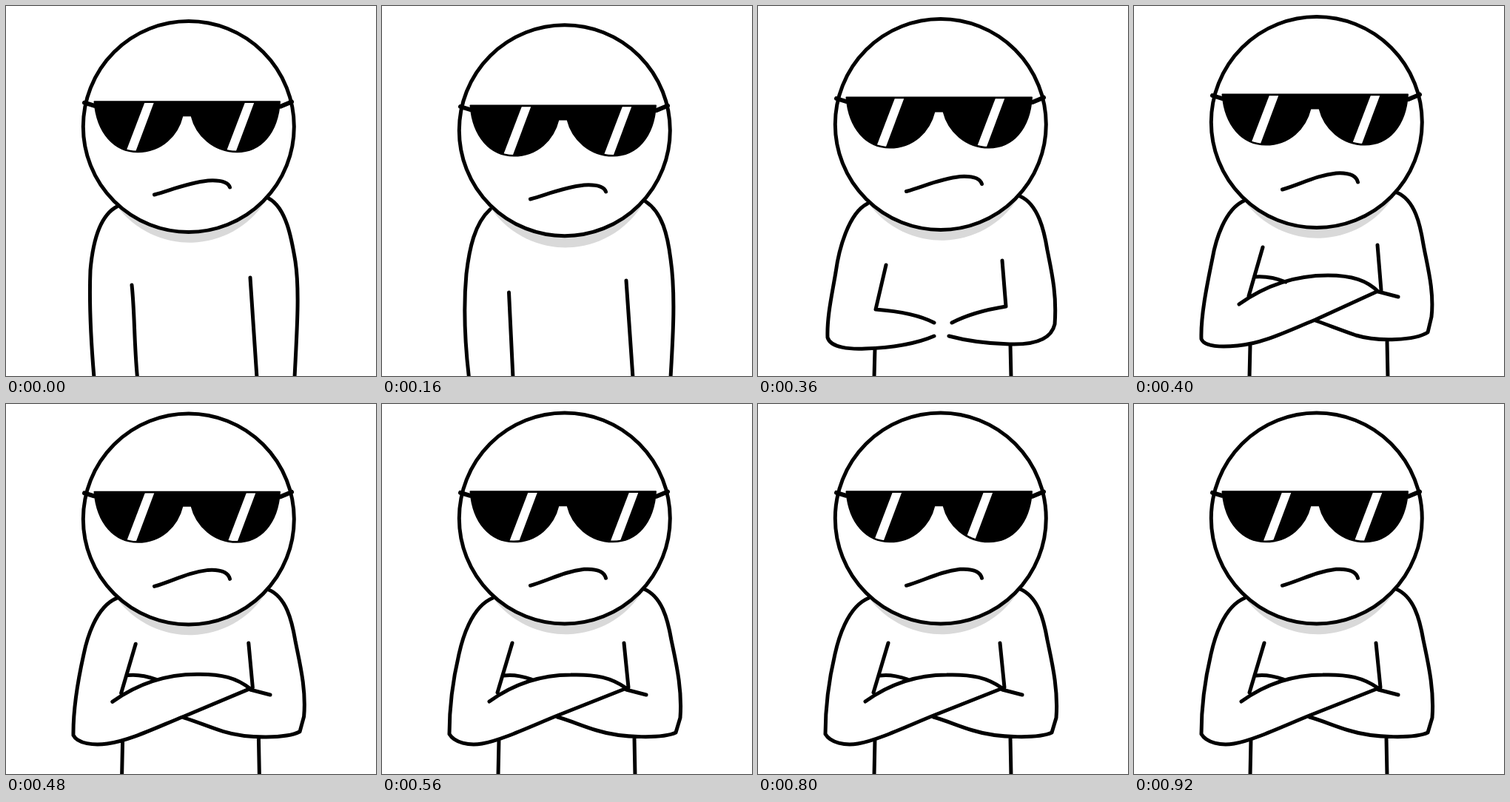
An HTML page that plays this animation: 500x500 px, repeating every 1800 ms.

```html
<!DOCTYPE html>
<html lang="en">
<head>
<meta charset="utf-8">
<title>Crossed arms</title>
<style>
  html, body { margin: 0; width: 100%; height: 100%; overflow: hidden; background: #fff; }
  svg { display: block; width: 100vw; height: 100vh; }
  .line { fill: none; stroke: #000; stroke-width: 5; stroke-linecap: round; stroke-linejoin: round; }
</style>
</head>
<body>
<svg viewBox="0 0 500 500">
  <defs>
    <!-- Glasses are drawn with their top edge at y = 0 -->
    <clipPath id="lenses">
      <path d="M121 2.8H238C236 34 212 67.5 178 67.5C147 67.5 125 44 121 2.8Z
               M251 2.8H369C366 44 343 67.5 312 67.5C280 67.5 256 42 251 20Z"/>
    </clipPath>
  </defs>
  <path id="shadow" fill="#d9d9d9" d="M150 107.5A122 122 0 0 0 350 101.5Z"/>
  <path id="body" class="line"/>
  <circle id="head" class="line" style="fill:#fff" cx="246.8" cy="0" r="142.5"/>
  <g id="glasses">
    <path class="line" stroke-width="6" style="stroke-width:6" d="M106 2.5L119 6.5M386 1.2L371 7.5"/>
    <path stroke="#000" stroke-width="2" stroke-linejoin="round"
      d="M119.5 1H370C367 44 344 69 312 69C281 69 257 47 250.5 20H238.5C232 47 210 69 178 69C147 69 123 44 119.5 1Z"/>
    <g clip-path="url(#lenses)" fill="#fff">
      <path id="shineL" d="M0 2H12.5L-12 67.5H-25Z"/>
      <path id="shineR" d="M0 2H12.5L-12 67.5H-25Z"/>
    </g>
  </g>
  <path id="mouth" class="line"/>
</svg>
<script>
const LOOP = 1800;
const el = id => document.getElementById(id);
const mix = (a, b, k) => a + (b - a) * k;

// Blend two paths that share the same commands
function mixPath(a, b, k) {
  const nums = b.match(/-?[\d.]+/g);
  let i = 0;
  return a.replace(/-?[\d.]+/g, n => mix(+n, +nums[i++], k).toFixed(2));
}

const hang = 'M150 271C125 284 117 322 114 357C112 408 115 455 119 502' +
  'M170 377C174 415 173 455 177.500 502' +
  'M355 260C379 273 386 315 391 345C397 385 393 440 390 502M330 367L339 502';
const dip = 'M146 275C125 294 118 328 114 362C110 405 112 455 117.500 502' +
  'M171.500 387L177 502' +
  'M356 264C379 279 386 310 390 342C397 390 393 450 390 502M330 371L339 502';
const rise = 'M148 271C126 280 118 330 113 360C107 405 111 455 115.500 502' +
  'M171 392C174 430 175 460 178 502' +
  'M353 261C377 273 384 302 389 330C399 388 395 440 392 502M330 379L338 502';
const swing = 'M148 267C122 280 109 330 105 360C100 390 93 420 94 448' +
  'C98 462 125 464 145 463C180 462 215 456 238 446M159 410C185 412 215 416 238 428' +
  'M173 350L159 410M330 344L335 406' +
  'M354 257C379 268 387 305 391 330C397 360 404 390 401 430' +
  'C396 452 370 458 340 457C305 456 280 452 258 446M335 406C310 410 285 416 262 428' +
  'M158 463L157 502M341 457L342 502';
const cross = 'M149 263C122 275 110 318 106 341C98 380 90 420 91 450' +
  'C95 461 120 461 140 459C175 456 210 438 245 424L328 386' +
  'M142 403C170 383 210 364 262 364C295 364 315 371 330 386M330 386L357 393' +
  'M164 366C178 365 190 367 205 373M174 326L155 392M329 323L334 384' +
  'M355 252C380 262 387 297 391 322C396 350 406 385 402 420L397 441' +
  'C380 452 330 454 300 445C280 438 262 431 245 425M157 458L156 502M342 453L343 502';
const settle = 'M150 262C120 274 108 320 104 338C96 372 91 410 91 446' +
  'C98 458 118 462 135 459C160 455 200 436 237 421L328 385' +
  'M145 402C170 384 205 366 255 366C290 365 310 370 330 384M330 386L357 393' +
  'M165 367C178 365 190 368 202 372M176 323L156 390M327 323L333 383' +
  'M354 250C378 260 386 290 391 319C397 348 406 385 403 424L397 444' +
  'C380 452 325 452 290 441C270 435 255 428 237 423M158 453L157 502M341 451L342 502';

// Head centre, shadow drop, glasses top, mouth corner, mouth height, body
const pose = (head, drop, glasses, mouth, tall, body) => ({ head, drop, glasses, mouth, tall, body });
const arrive = pose(157, 0, 118.5, 248, 22, cross);
const rest = pose(154.5, 0, 117.3, 245.3, 22, settle);
const between = k => {
  const p = {};
  for (const key of Object.keys(rest))
    p[key] = key === 'body' ? mixPath(cross, settle, k) : mix(arrive[key], rest[key], k);
  return p;
};

// Start time, pose, left and right glint
const steps = [
  [0, pose(163, 0, 128.2, 255, 19, hang), 187.5, 323],
  [160, pose(168.2, 1.5, 133.5, 261, 19, dip), 189, 325],
  [280, pose(163, 1, 127.2, 253.5, 19, rise), 187, 323],
  [360, pose(160, 0, 122.5, 250.5, 20, swing), 185, 321],
  [400, arrive, 183, 320],
  [480, between(0.6), 188, 325],
  [520, between(0.9), 192, 329],
  [560, rest, 197.5, 334],
  [600, rest, 212, 348],
  [640, rest, 136, 259],
  [680, rest, 152, 275]
];
// The glint slows down as it returns
for (let i = 1; i <= 6; i++) {
  const slide = 48 * (1 - Math.pow(1 - i / 6, 1.4));
  steps.push([680 + i * 40, rest, 152 + slide, 275 + slide]);
}

const moveY = (id, y) => el(id).setAttribute('transform', `translate(0 ${y})`);
const moveX = (id, x) => el(id).setAttribute('transform', `translate(${x} 0)`);

function draw([, p, left, right]) {
  moveY('head', p.head);
  moveY('shadow', p.head + p.drop);
  moveY('glasses', p.glasses);
  moveX('shineL', left);
  moveX('shineR', right);
  el('body').setAttribute('d', p.body);
  const y = p.mouth, top = y - p.tall;
  el('mouth').setAttribute('d',
    `M200.500 ${y}C225 ${y - 7} 246 ${top + 3} 273 ${top}C290 ${top - 1} 300 ${top + 2} 302.500 ${y - 10}`);
}

let shown;
const start = performance.now();
function tick() {
  const t = (performance.now() - start) % LOOP;
  const step = steps.filter(s => s[0] <= t).pop();
  if (step !== shown) draw(shown = step);
  requestAnimationFrame(tick);
}
tick();
</script>
</body>
</html>
```
